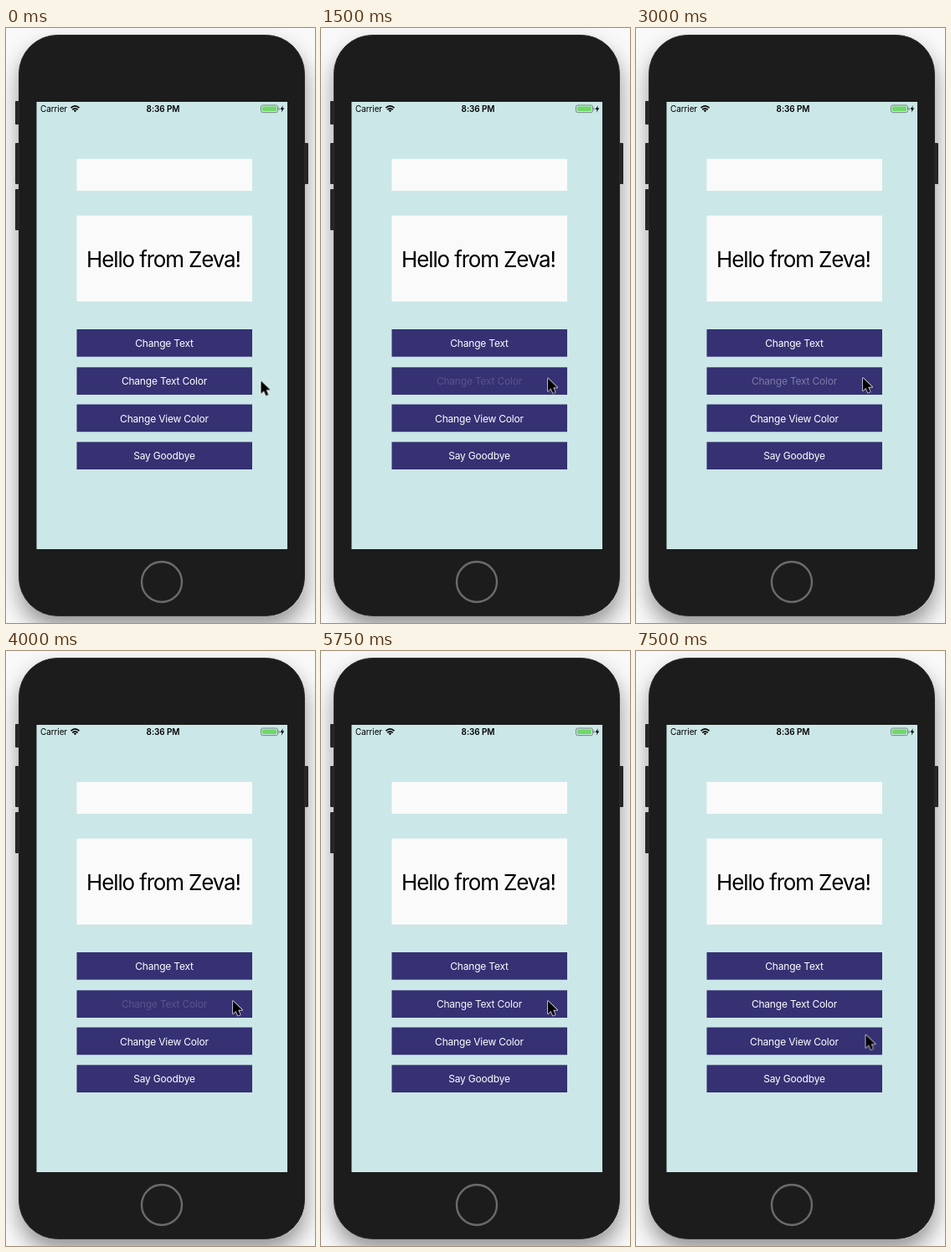
An HTML page for the animation above (8000 ms loop, 369 px wide and 709 px high).

```html
<!DOCTYPE html>
<html lang="en">
<head>
<meta charset="utf-8">
<title>Phone text color demo</title>
<style>
  html, body { margin: 0; width: 100%; height: 100%; overflow: hidden; background: #f9f9f9; }
  svg { display: block; position: absolute; left: 0; top: 0; }
  .shadow {
    position: absolute; left: 16px; top: 9px; width: 341px; height: 692px;
    border-radius: 46px; box-shadow: 0 13px 26px rgba(0, 0, 0, .42);
  }
  text { font-family: Inter, Roboto, sans-serif; }
  .status { font-size: 10px; letter-spacing: -.1px; }
  .time { font-weight: 600; }
  .label { font-size: 26px; letter-spacing: -1.15px; text-anchor: middle; }
  .button { font-size: 12px; letter-spacing: -.2px; fill: #fff; text-anchor: middle; }
</style>
</head>
<body>
<div class="shadow"></div>
<svg width="369" height="709" viewBox="0 0 369 709">
  <g fill="#262626">
    <rect x="11" y="87" width="7" height="28" rx="1"/>
    <rect x="11" y="137" width="7" height="49" rx="1"/>
    <rect x="11" y="192" width="7" height="49" rx="1"/>
    <rect x="354" y="137" width="7" height="49" rx="1"/>
  </g>
  <rect x="15.5" y="8.5" width="341" height="692" rx="46" fill="#1c1c1c" stroke="#2a2a2a"/>
  <circle cx="186" cy="660" r="24" fill="none" stroke="#6b6b6b" stroke-width="2.4"/>
  <rect x="36.5" y="88" width="299.5" height="533" fill="#cce7e7"/>

  <text class="status" x="41" y="100">Carrier</text>
  <g fill="none" stroke="#000" stroke-width="1.8">
    <path d="M77.5 95.2Q82.5 90.6 87.5 95.2M79.3 97.3Q82.5 94.4 85.7 97.3"/>
    <path d="M80.7 98.2Q82.5 96.8 84.3 98.2L82.5 100.2Z" fill="#000" stroke="none"/>
  </g>
  <text class="status time" x="187.5" y="100" text-anchor="middle">8:36 PM</text>
  <rect x="304.5" y="92" width="20" height="8.6" rx="2" fill="none" stroke="#728783"/>
  <rect x="306" y="93.5" width="17" height="5.6" rx=".8" fill="#70d867"/>
  <rect x="325.4" y="94.8" width="1.2" height="3" rx=".6" fill="#728783"/>
  <path d="M330.8 92.2L327.5 97H329.6L328.8 100.6L332.3 95.6H330.1Z"/>

  <rect x="84.5" y="156" width="209.5" height="38" fill="#fafafa"/>
  <rect x="84.5" y="223.5" width="209.5" height="102.5" fill="#fafafa"/>
  <text class="label" id="label" x="188" y="285">Hello from Zeva!</text>
  <g id="buttons"></g>
  <path id="cursor" d="M0 0V15.2L3.5 11.9L6 17.7L8.8 16.5L6.3 10.8H11.2Z"
        stroke="#fff" stroke-width="1.3" paint-order="stroke" stroke-linejoin="round"/>
</svg>
<script>
const LOOP = 8000;
const SVG = 'http://www.w3.org/2000/svg';
const $ = id => document.getElementById(id);

function add(parent, tag, attrs, text = '') {
  const node = document.createElementNS(SVG, tag);
  for (const [key, value] of Object.entries(attrs)) node.setAttribute(key, value);
  node.textContent = text;
  return parent.appendChild(node);
}

// Each step is [start in ms, value], held until the next one.
function hold(node, property, steps) {
  const frames = [...steps, [LOOP, steps.at(-1)[1]]].map(([time, value]) => ({
    offset: time / LOOP, [property]: value, easing: 'step-end'
  }));
  node.animate(frames, { duration: LOOP, iterations: Infinity });
}

const captions = [
  ['Change Text', 359], ['Change Text Color', 404.3],
  ['Change View Color', 448.5], ['Say Goodbye', 493.3]
].map(([caption, y]) => {
  add($('buttons'), 'rect', { x: 84.5, y, width: 209.5, height: 32.7, fill: '#353173' });
  return add($('buttons'), 'text', { class: 'button', x: 189, y: y + 21 }, caption);
});

const presses = [1500, 2750, 4000, 5250];
hold(captions[1], 'opacity', [[0, 1], ...presses.flatMap(time => [
  [time, .17], [time + 250, .36], [time + 500, .95], [time + 750, 1]
])]);

hold($('label'), 'fill', [[0, '#000'], ...presses.map((time, i) =>
  [time + 250, i % 2 ? '#000' : '#f18b2f']
)]);

hold($('cursor'), 'transform', [
  [0, 304.5, 420.5], [250, 295, 421], [500, 271.5, 417], [750, 271, 417.5],
  [2750, 271, 417], [6250, 271, 417.5], [6500, 282.5, 418],
  [6750, 304.5, 420.5], [7000, 302.5, 424], [7250, 274.5, 457.5]
].map(([time, x, y]) => [time, `translate(${x}px, ${y}px)`]));
</script>
</body>
</html>
```
